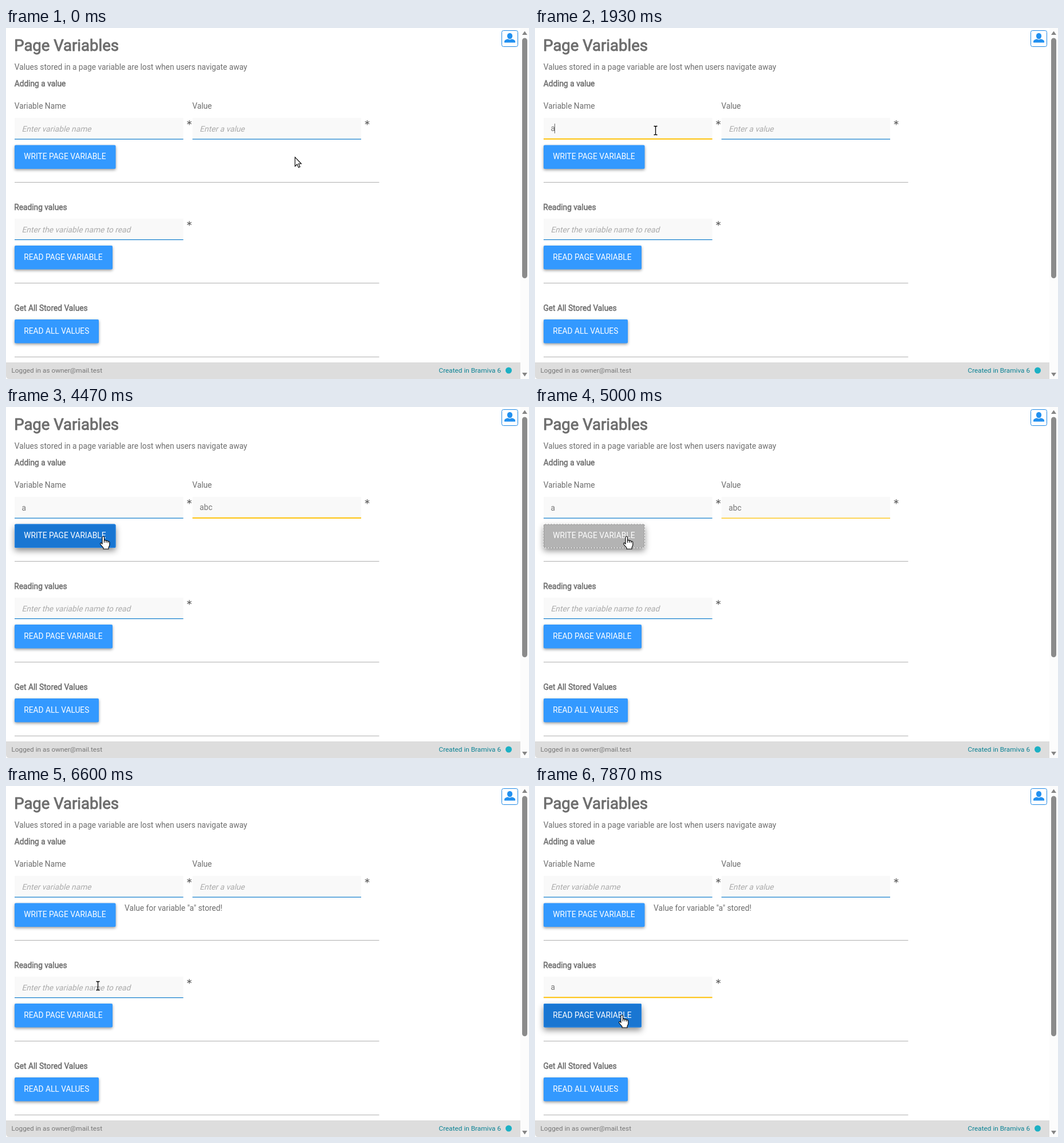
Animation of 913 by 613 pixels, one loop 8 s. Source, as an HTML page with a canvas:

```html
<!DOCTYPE html>
<html lang="en">
<head>
<meta charset="utf-8">
<title>Page Variables</title>
<style>
  html, body { margin: 0; width: 100%; height: 100%; overflow: hidden; background: #fff; }
  canvas { display: block; }
</style>
</head>
<body>
<canvas id="stage" width="913" height="613"></canvas>
<script>
const ctx = document.getElementById('stage').getContext('2d');
const LOOP = 8000, FPS = 15;
const GREY = '#6e6e6e', BLUE = '#2185d0', YELLOW = '#ffc107';
const BODY = 13.76, SMALL = 11.8;

// Pointer hotspot: [tick, x, y]
const PATH = [
  [0, 503.5, 225], [13, 216.5, 188], [16, 210.5, 179], [29, 210.5, 179],
  [38, 385.5, 176], [61, 385.5, 176], [67, 170, 226], [72, 160, 226],
  [86, 160, 226], [95, 161.5, 346], [97, 161.5, 346], [99, 160.5, 349],
  [111, 160.5, 349], [116, 152, 400]
];

// Ranges are [first tick, end tick)
const FIELDS = [
  { x: 15, y: 157, bottom: 194.8, hint: 'Enter variable name',
    typed: [[29, 'a'], [77, '']], focus: [21, 37], tint: [26, 40], caret: [[26, 37]] },
  { x: 325.5, y: 157, bottom: 194.8, hint: 'Enter a value',
    typed: [[43, 'a'], [51, 'ab'], [57, 'abc'], [77, '']],
    focus: [37, 75], tint: [43, 76], caret: [[43, 65], [73, 75]] },
  { x: 15, y: 333, bottom: 370.3, hint: 'Enter the variable name to read',
    typed: [[110, 'a']], focus: [102, 999], tint: [106, 999], caret: [[106, 118]] }
];
const FIELD_W = 294.5;

const BUTTONS = [
  { y: 204.5, w: 176.5, label: 'WRITE PAGE VARIABLE', busy: [75, 77] },
  { y: 380, w: 171, label: 'READ PAGE VARIABLE' },
  { y: 509, w: 147, label: 'READ ALL VALUES' }
];
const BUTTON_H = 41.5;

const ARROW = new Path2D('M.5 .5V16.5L4.2 13L6.7 18.6L9.2 17.5L6.8 12H11.5Z');
const HAND = new Path2D('M-2 1.5Q-2 0-.3 0Q1.5 0 1.5 1.5V7Q3.5 6 4.8 7.6Q7 6.8 8 8.6Q10.8 8 10.8 11V15.5L9 19.5V22H0V20L-5 14Q-6 11.5-4 11.3L-2 13Z');
const KNUCKLES = new Path2D('M1.5 7V11M4.8 8V11M8 9V11.5');
const BEAM = new Path2D('M-3 -7.5H-1L0 -6.5L1 -7.5H3M0 -6.5V6.5M-3 7.5H-1L0 6.5L1 7.5H3');

const within = (k, [a, b]) => k >= a && k < b;
const hits = (p, x, y, w, h) => p.x >= x && p.x < x + w && p.y >= y && p.y < y + h;

function text(str, x, y, { size = BODY, color = GREY, bold = 0, slant = 0 } = {}) {
  ctx.save();
  ctx.translate(x, y);
  ctx.transform(1, 0, -slant, 1, 0, 0);
  ctx.font = `${size}px Roboto, Arial, sans-serif`;
  ctx.fillStyle = ctx.strokeStyle = color;
  ctx.fillText(str, 0, 0);
  if (bold) {
    ctx.lineWidth = bold;
    ctx.lineJoin = 'round';
    ctx.strokeText(str, 0, 0);
  }
  ctx.restore();
}

function rect(x, y, w, h, color) {
  ctx.fillStyle = color;
  ctx.fillRect(x, y, w, h);
}

function roundRect(x, y, w, h, r) {
  ctx.beginPath();
  ctx.roundRect(x, y, w, h, r);
}

function polygon(color, ...pts) {
  ctx.fillStyle = color;
  ctx.beginPath();
  pts.forEach(([x, y]) => ctx.lineTo(x, y));
  ctx.fill();
}

function asterisk(x, y) {
  ctx.strokeStyle = '#606060';
  ctx.lineWidth = 1.2;
  ctx.beginPath();
  for (let i = 0; i < 3; i++) {
    const a = Math.PI / 2 + i * Math.PI / 3;
    const dx = Math.cos(a) * 4.3, dy = Math.sin(a) * 4.3;
    ctx.moveTo(x - dx, y - dy);
    ctx.lineTo(x + dx, y + dy);
  }
  ctx.stroke();
}

function drawField(f, k) {
  const focused = within(k, f.focus);
  const line = focused ? 2 : 1.3;
  const base = f.y + (focused ? 22.5 : 23.5);
  const left = f.x + 12.5;
  let value = '';
  for (const [at, str] of f.typed) if (k >= at) value = str;

  rect(f.x, f.y, FIELD_W, f.bottom - f.y, '#f9f9f9');
  rect(f.x, f.bottom - line, FIELD_W, line, within(k, f.tint) ? YELLOW : BLUE);
  if (value) text(value, left, base, { color: '#777' });
  else text(f.hint, left, base, { color: '#aaa', slant: 0.25 });

  if (f.caret.some(span => within(k, span))) {
    ctx.font = `${BODY}px Roboto, Arial, sans-serif`;
    const x = Math.floor(left + ctx.measureText(value).width);
    rect(x, f.y + 10, 1, 17, '#666');
  }
}

function drawButton(b, k, p) {
  const busy = b.busy && within(k, b.busy);
  const hover = hits(p, 15, b.y, b.w, BUTTON_H);
  ctx.save();
  ctx.shadowColor = hover ? 'rgba(0,0,0,.45)' : 'rgba(0,0,0,.4)';
  ctx.shadowBlur = hover ? 11 : 5;
  ctx.shadowOffsetY = hover ? 5 : 2;
  ctx.fillStyle = busy ? '#b3b3b3' : hover ? '#1976d2' : '#3399ff';
  roundRect(15, b.y, b.w, BUTTON_H, 2);
  ctx.fill();
  ctx.restore();
  if (hover) {
    ctx.lineWidth = 1;
    ctx.strokeStyle = busy ? '#999' : '#2b89e6';
    roundRect(15.5, b.y + 0.5, b.w - 1, BUTTON_H - 1, 2);
    ctx.stroke();
  }
  if (busy) {
    ctx.save();
    ctx.setLineDash([3, 2]);
    ctx.strokeStyle = '#fff';
    ctx.strokeRect(14.5, b.y, b.w + 0.5, BUTTON_H);
    ctx.restore();
  }
  text(b.label, 31.3, b.y + 24.5, { color: '#fff' });
}

function drawPage() {
  rect(0, 0, 913, 613, '#fff');
  text('Page Variables', 14.2, 39.7, { size: 27.5, bold: 0.9 });
  text('Values stored in a page variable are lost when users navigate away', 14.7, 73);
  text('Adding a value', 14.7, 102, { bold: 0.5 });
  text('Variable Name', 14.7, 141);
  text('Value', 325.2, 141);
  text('Reading values', 14.2, 317.5, { bold: 0.5 });
  text('Get All Stored Values', 14.4, 493.5, { bold: 0.5 });
  asterisk(320, 165.3);
  asterisk(630.5, 165.3);
  asterisk(320, 341.3);
  for (const y of [269, 445, 574]) rect(15, y, 636.5, 1, '#b0b0b0');
}

function drawFrame() {
  // Account button
  ctx.strokeStyle = '#1e88e5';
  ctx.lineWidth = 1;
  roundRect(865.5, 4.5, 28, 28, 3);
  ctx.stroke();
  ctx.fillStyle = '#2190f0';
  ctx.beginPath();
  ctx.ellipse(879.5, 14, 4.6, 5.2, 0, 0, 7);
  ctx.fill();
  ctx.fill(new Path2D('M870 25.5V23.5Q870 20.5 876 19.3Q879.5 21.5 883 19.3Q889 20.5 889 23.5V25.5Z'));

  // Footer
  rect(0, 584, 898, 29, '#dddddd');
  text('Logged in as owner@mail.test', 9.5, 602, { size: SMALL, color: '#777' });
  text('Created in Bramiva 6', 755.5, 602, { size: SMALL, color: '#0b8294' });
  ctx.fillStyle = '#1cb0c4';
  ctx.beginPath();
  ctx.arc(877.5, 598, 5.5, 0, 7);
  ctx.fill();
  ctx.fillStyle = '#fff';
  ctx.fill(new Path2D('M0 607Q0 613 6 613H0Z'));

  // Scrollbar
  rect(898, 0, 15, 613, '#fcfcfc');
  ctx.fillStyle = '#8b8b8b';
  roundRect(901, 17.5, 9, 419.5, 4.5);
  ctx.fill();
  polygon('#858585', [901, 12], [905.5, 5.5], [910, 12]);
  polygon('#858585', [901, 602], [910, 602], [905.5, 608.5]);
}

function pointerAt(k) {
  let i = 0;
  while (i < PATH.length - 1 && PATH[i + 1][0] <= k) i++;
  const [k0, x0, y0] = PATH[i];
  const [k1, x1, y1] = PATH[i + 1] || [k0 + 1, x0, y0];
  const u = Math.min(1, (k - k0) / (k1 - k0));
  const e = u * u * (3 - 2 * u);
  return { x: x0 + (x1 - x0) * e, y: y0 + (y1 - y0) * e };
}

function drawPointer(p) {
  const overField = FIELDS.some(f => hits(p, f.x, f.y, FIELD_W, f.bottom - f.y));
  const overButton = BUTTONS.some(b => hits(p, 15, b.y, b.w, BUTTON_H));
  ctx.save();
  ctx.translate(overField ? Math.floor(p.x) + 0.5 : Math.round(p.x), Math.round(p.y));
  ctx.fillStyle = '#fff';
  ctx.strokeStyle = '#000';
  ctx.lineWidth = overField ? 1.3 : 1.1;
  if (overField) {
    ctx.stroke(BEAM);
  } else {
    const shape = overButton ? HAND : ARROW;
    ctx.fill(shape);
    ctx.stroke(shape);
    if (overButton) ctx.stroke(KNUCKLES);
  }
  ctx.restore();
}

function draw(now) {
  const k = Math.floor((now % LOOP) * FPS / 1000 + 0.1);
  const p = pointerAt(k);
  drawPage();
  FIELDS.forEach(f => drawField(f, k));
  BUTTONS.forEach(b => drawButton(b, k, p));
  if (k >= 77) text('Value for variable "a" stored!', 207, 218);
  drawFrame();
  drawPointer(p);
}

let start;
function tick(now) {
  start ??= now;
  draw(now - start);
  requestAnimationFrame(tick);
}
draw(0);
requestAnimationFrame(tick);
</script>
</body>
</html>
```
